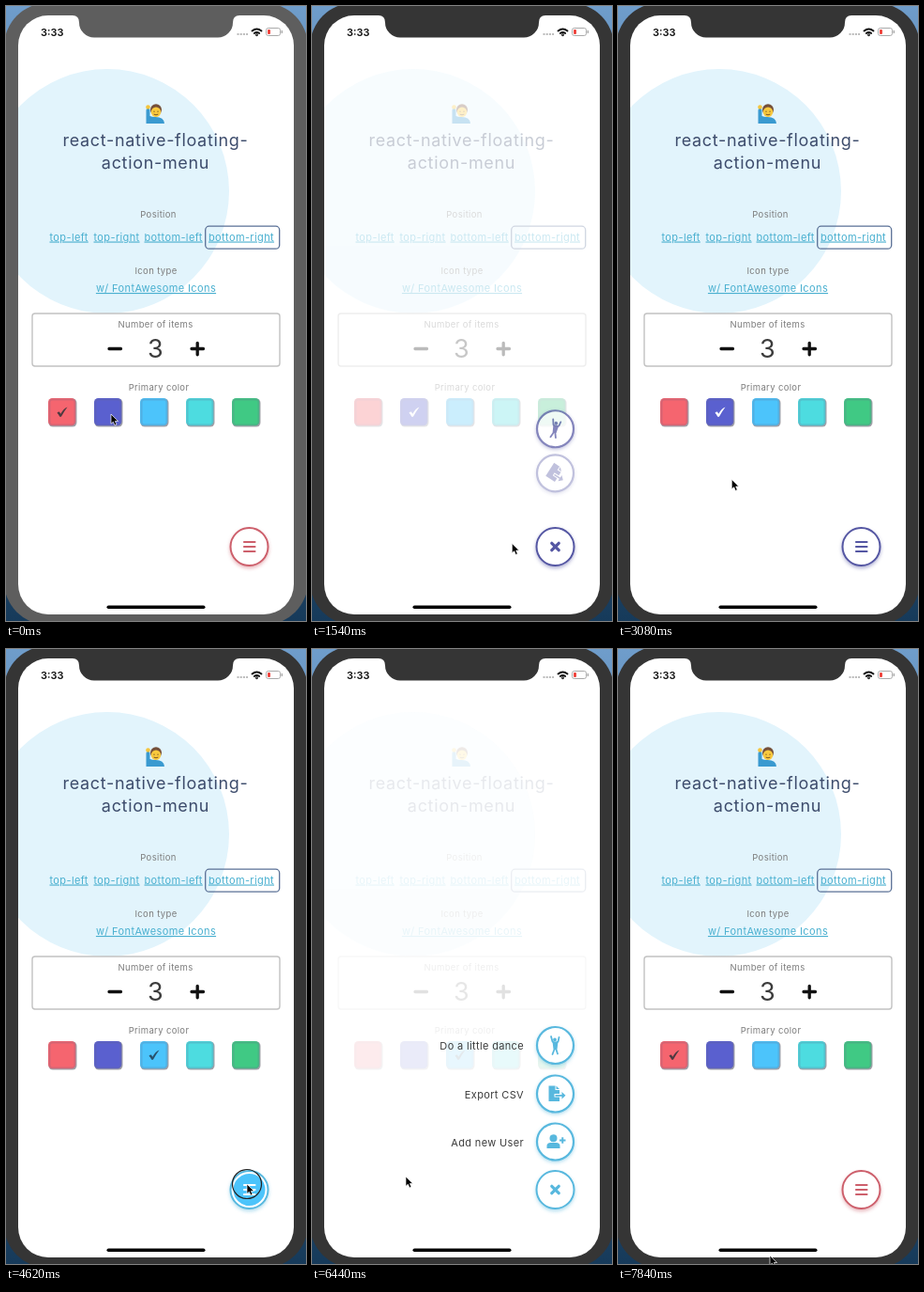
Animation of 320x654 px, one loop 7910 ms. Source, as an HTML page:

```html
<!DOCTYPE html>
<html lang="en">
<head>
<meta charset="utf-8">
<title>Floating action menu</title>
<style>
  html, body { margin: 0; width: 100%; height: 100%; overflow: hidden; background: #17344f; }
  svg { display: block; width: 320px; height: 654px; font-family: Inter, Roboto, sans-serif; }
  text { letter-spacing: .35px; }
  .title { font-size: 18px; letter-spacing: .67px; fill: #3d4c6c; text-anchor: middle; }
  .small { font-size: 9.5px; fill: #7c7c7c; text-anchor: middle; }
  .link { font-size: 11px; letter-spacing: .38px; fill: #4ab0d0; text-decoration: underline; }
  .label { font-size: 11px; fill: #3c3c3c; text-anchor: end; }
  .clock { font-size: 11px; font-weight: 600; letter-spacing: 0; fill: #111; }
  .line { fill: none; stroke-linecap: round; stroke-linejoin: round; }
</style>
</head>
<body>
<svg viewBox="0 0 320 654">
  <defs>
    <clipPath id="screen"><rect x="13" y="10" width="294" height="637" rx="32"/></clipPath>
    <filter id="glow" x="-30%" y="-30%" width="160%" height="160%"><feGaussianBlur stdDeviation="2"/></filter>
    <linearGradient id="desk" x2="0" y2="1">
      <stop stop-color="#6f9dcb"/><stop offset="1" stop-color="#163a5a"/>
    </linearGradient>
  </defs>
  <rect width="320" height="654" fill="url(#desk)"/>
  <rect id="bezel" x="-2" y="-3" width="324" height="661" rx="46"/>
  <rect x="13" y="10" width="294" height="637" rx="32" fill="#fff"/>

  <g clip-path="url(#screen)">
    <g id="content">
      <circle cx="108" cy="197" r="130" fill="#e2f4fc"/>
      <g id="emoji">
        <path d="M149.500 125V111q0-2.500 2-2.500t2 2.500v6q2 1 6 1 9 0 9.500 7z" fill="#3a9ad0"/>
        <circle cx="151.500" cy="107.500" r="2.300" fill="#f5c53c"/>
        <circle cx="160" cy="110.300" r="6" fill="#75503a"/>
        <circle cx="160" cy="112.800" r="5.200" fill="#f9c93e"/>
        <path class="line" d="M158 112v.5M162 112v.5M158 115.300q2 1.300 4 0" stroke="#6b4a22" stroke-width=".9"/>
      </g>
      <text class="title" x="159.500" y="149">react-native-floating-</text>
      <text class="title" x="159.500" y="173">action-menu</text>
      <text class="small" x="162.500" y="225">Position</text>
      <text class="link" x="46.500" y="249.500">top-left</text>
      <text class="link" x="93.500" y="249.500">top-right</text>
      <text class="link" x="147.500" y="249.500">bottom-left</text>
      <text class="link" x="216" y="249.500">bottom-right</text>
      <rect x="212.700" y="234.200" width="79" height="24" rx="4" fill="none" stroke="#5a7096" stroke-width="1.300"/>
      <text class="small" x="160" y="284.500">Icon type</text>
      <text class="link" x="160" y="304" text-anchor="middle">w/ FontAwesome Icons</text>
      <rect x="28" y="327" width="264" height="56" rx="3" fill="none" stroke="#c2c2c2" stroke-width="1.400"/>
      <text class="small" x="159.500" y="341.500">Number of items</text>
      <text x="159.500" y="374" font-size="27" fill="#3c3c3c" text-anchor="middle">3</text>
      <path class="line" d="M110 364.500h12.500M198 364.500h12.500M204.200 358.300v12.500" stroke="#111" stroke-width="3.300"/>
      <text class="small" x="163" y="408.500">Primary color</text>
      <g id="swatches"></g>
      <path id="check" d="M-5.500 .8Q-4-1-2.800-.2L-1.800 1.800Q1.500-4 5.500-5.500Q2-1 -.8 4.300Q-2 5.500-3 4.300Q-4 2-5.500 .8z"/>
    </g>
    <g id="menu"></g>
    <g id="fab" transform="translate(259.500 575)">
      <circle class="halo" cy="2" r="20.500" filter="url(#glow)" opacity=".55"/>
      <circle id="disc" r="20" stroke-width="2"/>
      <circle id="inner" r="18" fill="none" stroke="#fff" stroke-width="2"/>
      <path id="bars" class="line" d="M-5.500-5H6M-5.500 0H6M-5.500 5H6" stroke-width="2.200"/>
      <path id="cross" class="line" d="M-3.700-3.700L3.700 3.700M3.700-3.700L-3.700 3.700" stroke-width="3.200"/>
    </g>
  </g>

  <path id="notch" d="M71 8v2Q78 10 78 17.500A16 16 0 0 0 94 33.500H226A16 16 0 0 0 242 17.500Q242 10 249 10V8z"/>
  <text class="clock" x="37" y="31.500">3:33</text>
  <path d="M246.500 30h11.500" stroke="#bbb" stroke-width="2" stroke-dasharray="2 1.200"/>
  <g class="line" stroke="#111" stroke-width="1.900">
    <path d="M262.500 26.500Q267.500 22.300 272.500 26.500M264.800 29Q267.500 26.800 270.200 29"/>
    <circle cx="267.500" cy="30.800" r=".5"/>
  </g>
  <rect x="277.500" y="23.500" width="15" height="8" rx="2.200" fill="#fff" stroke="#aaa"/>
  <rect x="279" y="25" width="3" height="5" rx="1" fill="#f0443e"/>
  <path d="M294.300 26v3" stroke="#aaa" stroke-width="1.400"/>
  <rect x="107.500" y="637.500" width="105" height="3.600" rx="1.800" fill="#000"/>

  <g id="cursor">
    <circle id="ring" r="15.500" fill="none" stroke="#222" stroke-width="1.200"/>
    <path d="M0 0V10.300L2.400 8.200L4 12L6 11.100L4.400 7.500H7.600z" fill="#000" stroke="#fff" stroke-width=".7"/>
  </g>
</svg>
<script>
const LOOP = 7910;
const $ = id => document.getElementById(id);
const clamp = v => Math.min(1, Math.max(0, v));
const within = (t, spans) => spans.find(([a, b]) => t >= a && t < b);

const swatches = ['#f5656f', '#5a60cf', '#4cc4fb', '#4ddce0', '#40c984'];
const accents = ['#cd606c', '#5557a3', '#58b8de'];
const checks = ['#4d3a40', '#ffffff', '#28506a'];
const swatchX = i => 60 + 49 * i;

// Each swatch: grey rim at the lower right, face, faint inner bevel
$('swatches').innerHTML = swatches.map((c, i) => `
  <g transform="translate(${swatchX(i)} 432)">
    <rect x="-14.500" y="-14.500" width="30" height="30" rx="4.500" fill="#85858f" opacity=".75"/>
    <rect x="-15" y="-15" width="29.300" height="29.300" rx="4.500" fill="${c}"/>
    <rect x="-13.500" y="-13.500" width="27" height="27" rx="3"
      fill="none" stroke="#6a6a88" stroke-opacity=".22" stroke-width="2"/>
  </g>`).join('');

// y: resting place, rise: travel while opening, wait: stagger
const items = [
  { text: 'Do a little dance', y: 421.500, rise: 154, wait: 0, icon: `
    <circle cx="-.5" cy="-6" r="1.900"/>
    <path class="line ink" d="M-4.500-9.500L-3-4L0-2L3-4L4-8.500M0-2L-.5 3L-3 9.500M.5 3L2.500 9" stroke-width="1.800"/>
    <path d="M-3-4H3L2 4H-2z"/>` },
  { text: 'Export CSV', y: 473, rise: 51, wait: 50, icon: `
    <path d="M-7-8.500H0V-4H4.500V0H-1V3.500H4.500V8H-7z"/>
    <path d="M1-8.500L4.500-5H1zM0 1H7V-2L11 1.800L7 5.500V2.700H0z"/>` },
  { text: 'Add new User', y: 524, rise: 51, wait: 125, icon: `
    <circle cx="-2" cy="-3.700" r="4"/>
    <path d="M-9 7V4.500Q-9 1-5 1H1Q5 1 5 4.500V7z"/>
    <path class="ink" d="M4.500-1.500H11M7.750-4.800V1.800" stroke-width="2"/>` }
];

$('menu').innerHTML = items.map(m => `
  <g class="item">
    <text class="label" y="4.500">${m.text}</text>
    <g class="button" transform="translate(259.500 0)">
      <circle class="halo" cy="1.500" r="20" filter="url(#glow)" opacity=".6"/>
      <circle class="ink" r="19.500" fill="#fff" stroke-width="2.200"/>
      <g class="icon">${m.icon}</g>
    </g>
  </g>`).join('');
const nodes = [...document.querySelectorAll('.item')].map(g => ({
  g, label: g.querySelector('.label'), icon: g.querySelector('.icon')
}));

const opens = [[1390, 2450], [4650, 6445]];
const presses = [[1270, 1385], [4530, 4645]];
const clicks = [...presses, [2330, 2440], [3390, 3480], [6300, 6430], [7000, 7090]];

// Stops of the pointer: time, x, y
const path = [
  [0, 112, 434], [500, 112, 434], [1200, 257, 570], [1390, 257, 570],
  [1850, 84, 576], [2880, 84, 576], [3280, 158, 432], [3750, 158, 432],
  [4420, 257, 569], [4690, 257, 569], [5180, 100, 561], [6560, 100, 561],
  [6920, 60, 434], [7350, 60, 434], [7840, 162, 645], [LOOP, 162, 645]
];

function pointer(t) {
  const i = path.findIndex(p => p[0] > t);
  const [a, x, y] = path[i - 1], [b, x2, y2] = path[i];
  const u = (t - a) / (b - a), e = u * u * (3 - 2 * u);
  return [x + (x2 - x) * e, y + (y2 - y) * e];
}

// Underdamped spring from 0 to 1, time in ms
function spring(ms) {
  if (ms <= 0) return 0;
  const s = ms / 1000, decay = 9.5, freq = 11;
  return 1 - Math.exp(-decay * s) * (Math.cos(freq * s) + decay / freq * Math.sin(freq * s));
}

function progress(t, wait) {
  const last = opens.filter(o => t >= o[0]).pop();
  if (!last) return 0;
  return t < last[1] ? spring(t - last[0] - wait)
                     : 1 - clamp(spring(t - last[1] - (125 - wait) * .6));
}

function paint(group, color) {
  group.setAttribute('fill', color);
  group.querySelectorAll('.ink').forEach(n => n.setAttribute('stroke', color));
}

function render(t) {
  const pick = t < 150 || t >= 7090 ? 0 : t < 3480 ? 1 : 2;
  const color = accents[pick];
  const open = within(t, opens), pressed = within(t, presses);
  const shell = t < 70 ? '#5e5e5e' : '#353535';
  $('bezel').setAttribute('fill', shell);
  $('notch').setAttribute('fill', shell);
  $('content').setAttribute('opacity', 1 - .88 * clamp(progress(t, 0)));
  $('check').setAttribute('transform', `translate(${swatchX(pick)} 432)`);
  $('check').setAttribute('fill', checks[pick]);

  paint($('menu'), color);
  nodes.forEach(({ g, label, icon }, i) => {
    const m = items[i], p = progress(t, m.wait), q = 1 - p;
    g.setAttribute('transform', `translate(0 ${m.y + m.rise * q})`);
    g.setAttribute('opacity', clamp(p) ** 1.6);
    label.setAttribute('x', 226 + 40 * q);
    label.setAttribute('opacity', clamp((p - .84) * 7));
    icon.setAttribute('transform', `rotate(${70 * q})`);
  });

  $('fab').setAttribute('fill', color);
  $('disc').setAttribute('fill', pressed ? swatches[pick] : '#fff');
  $('disc').setAttribute('stroke', color);
  $('inner').setAttribute('opacity', pressed ? 1 : 0);
  $('bars').setAttribute('stroke', pressed ? '#fff' : color);
  $('cross').setAttribute('stroke', color);
  $('bars').setAttribute('opacity', open ? 0 : 1);
  $('cross').setAttribute('opacity', open ? 1 : 0);

  $('cursor').setAttribute('transform', `translate(${pointer(t)})`);
  $('ring').setAttribute('opacity', within(t, clicks) ? 1 : 0);
}

function tick() {
  render(performance.now() % LOOP);
  requestAnimationFrame(tick);
}
tick();
</script>
</body>
</html>
```
